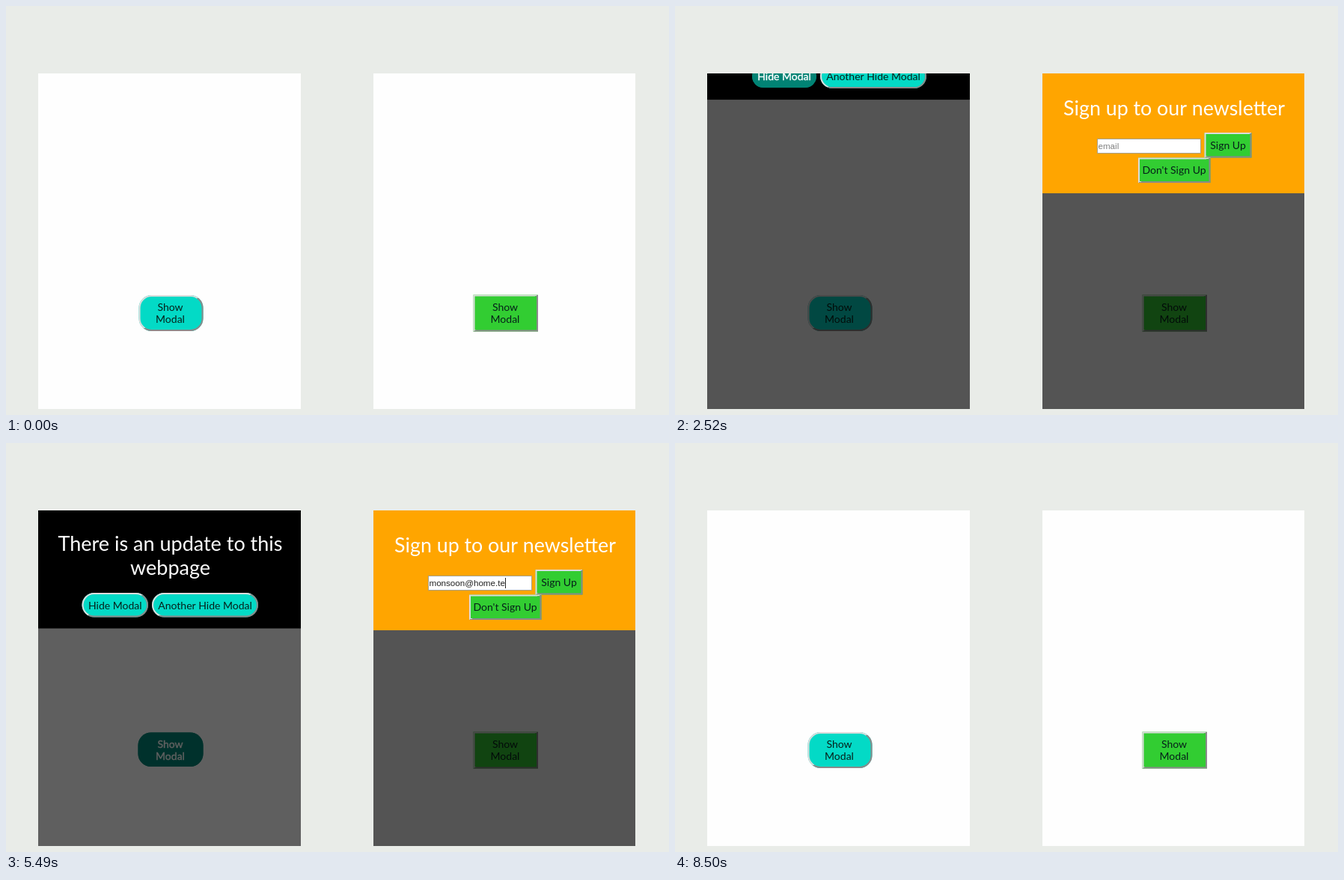
Write an HTML page with a canvas that moves like this. It is 886x546 px and loops after 9050 ms.

```html
<!DOCTYPE html>
<html lang="en">
<head>
<meta charset="utf-8">
<title>Modal demo</title>
<style>
html, body { margin: 0; width: 886px; height: 546px; overflow: hidden; background: #e9ece8; }
canvas { display: block; }
</style>
</head>
<body>
<canvas id="stage" width="886" height="546"></canvas>
<script>
const ctx = document.getElementById('stage').getContext('2d');
const LOOP = 9050;
const TOP = 90, PANEL_H = 448, MODAL_H = 160;
const EMAIL = 'monsoon@home.test';
const KEY_TIMES = [2760, 2830, 2910, 2980, 3370, 3450, 3520, 3840, 4710,
  4790, 4860, 5010, 5170, 5320, 5490, 5560, 5640];

const TEAL = { fill: '#03dac6', focusFill: '#018374', focusEdge: '#018374', focusText: '#fff' };
const GREEN = { fill: '#32cd32', focusFill: '#b8860b', focusEdge: '#ffa500', focusText: '#0a2a24' };

const LEFT = { x: 43, w: 351, fadeIn: 2147, slideIn: 2279, fadeOut: 5440, slideOut: 5432 };
const RIGHT = { x: 491, w: 350, fadeIn: 1495, slideIn: 1626, fadeOut: 6680, slideOut: 6680 };

const progress = (t, start, length) => Math.min(1, Math.max(0, (t - start) / length));
const smooth = p => p * p * (3 - 2 * p);
const within = (t, from, to) => t >= from && t < to;

function label(text, x, y, size, color, align = 'center', family = 'Lato, sans-serif') {
  ctx.font = `${size}px ${family}`;
  ctx.textAlign = align;
  ctx.fillStyle = color;
  ctx.fillText(text, x, y);
}

function roundBox(x, y, w, h, r) {
  ctx.beginPath();
  ctx.roundRect(x, y, w, h, r);
}

// Outset border: light on the top and left, dark on the bottom and right.
function bevel(x, y, w, h) {
  const cx = x + w / 2, cy = y + h / 2;
  const g = ctx.createLinearGradient(cx - h / 2, cy - w / 2, cx + h / 2, cy + w / 2);
  g.addColorStop(0, '#dcdcdc');
  g.addColorStop(0.5, '#dcdcdc');
  g.addColorStop(0.5, '#8a8a8a');
  g.addColorStop(1, '#8a8a8a');
  return g;
}

function button(x, y, w, h, r, theme, focused, lines, textX, baseline) {
  const edge = focused ? 1 : 2;
  roundBox(x, y, w, h, r);
  ctx.fillStyle = focused ? theme.focusFill : theme.fill;
  ctx.fill();
  roundBox(x + edge / 2, y + edge / 2, w - edge, h - edge, Math.max(0, r - edge / 2));
  ctx.lineWidth = edge;
  ctx.strokeStyle = focused ? theme.focusEdge : bevel(x, y, w, h);
  ctx.stroke();
  const color = focused ? theme.focusText : '#06201a';
  lines.forEach((line, i) => {
    label(line, textX, baseline + i * 16, 14, color);
    if (focused && theme === TEAL) {
      ctx.lineWidth = 0.4;
      ctx.strokeStyle = color;
      ctx.strokeText(line, textX, baseline + i * 16);
    }
  });
}

function showLeft(t) {
  const focused = within(t, 1370, 2150) || within(t, 5470, 7300);
  const box = focused ? [176.5, 386.5, 87, 45.5] : [177.5, 386, 86, 48];
  button(...box, 17, TEAL, focused, ['Show', 'Modal'], 219.5, 407);
}

function showRight(t) {
  const focused = within(t, 820, 1500) || within(t, 6650, 8500);
  const box = focused ? [624, 384.5, 87, 50] : [624.5, 385.5, 86.5, 49];
  button(...box, 0, GREEN, focused, ['Show', 'Modal'], 667, 407);
}

function leftModal(t) {
  label('There is an update to this', 219.5, 146.5, 27, '#fff');
  label('webpage', 219.5, 178.5, 27, '#fff');
  const second = within(t, 3370, 4220) || within(t, 4710, 5470);
  const first = t < 5470 && !second;
  let x = first || second ? 103 : 101.5;
  const place = (text, w, focused) => {
    const width = focused ? w - 2.5 : w;
    const box = focused ? [x, 204, width, 30] : [x, 202.5, width, 32.5];
    button(...box, box[3] / 2, TEAL, focused, [text], x + width / 2, 224);
    x += width + 5;
  };
  place('Hide Modal', 88.5, first);
  place('Another Hide Modal', 142, second);
}

function emailField(t) {
  const family = '"Liberation Sans", Arial, sans-serif';
  ctx.fillStyle = '#fff';
  ctx.fillRect(564, 177, 139, 20);
  ctx.lineWidth = 1;
  ctx.strokeStyle = '#a5a08c';
  ctx.strokeRect(564.5, 177.5, 138, 19);
  const typed = EMAIL.slice(0, KEY_TIMES.filter(k => k <= t).length);
  label(typed || 'email', 565.5, 190.5, 11.6, typed ? '#222' : '#808080', 'left', family);
  const caret = typed && t < 6110 && !within(t, 4390, 4710);
  if (caret) {
    ctx.fillRect(Math.round(565.5 + ctx.measureText(typed).width), 180, 1, 14);
  }
}

function rightModal(t) {
  label('Sign up to our newsletter', 667, 146, 26.8, '#fff');
  emailField(t);
  button(707.5, 169, 63, 33.5, 0, GREEN, within(t, 6110, 6340), ['Sign Up'], 739, 191);
  button(619, 202.5, 96.5, 33.5, 0, GREEN, within(t, 6340, 6650), ["Don't Sign Up"], 667, 224);
}

function panel(t, p, modalColor, drawShow, drawModal) {
  ctx.save();
  ctx.beginPath();
  ctx.rect(p.x, TOP, p.w, PANEL_H);
  ctx.clip();
  ctx.fillStyle = '#fefefe';
  ctx.fillRect(p.x, TOP, p.w, PANEL_H);
  drawShow(t);

  const shade = progress(t, p.fadeIn, 200) - progress(t, p.fadeOut, 200) ** 2;
  ctx.fillStyle = `rgba(0,0,0,${shade * 0.667})`;
  ctx.fillRect(p.x, TOP, p.w, PANEL_H);

  const shown = smooth(progress(t, p.slideIn, 800)) - smooth(progress(t, p.slideOut, 800));
  if (shown > 0) {
    ctx.translate(0, (shown - 1) * MODAL_H);
    ctx.fillStyle = modalColor;
    ctx.fillRect(p.x, TOP, p.w, MODAL_H);
    drawModal(t);
  }
  ctx.restore();
}

function frame() {
  const t = performance.now() % LOOP;
  ctx.fillStyle = '#e9ece8';
  ctx.fillRect(0, 0, 886, 546);
  panel(t, LEFT, '#000', showLeft, leftModal);
  panel(t, RIGHT, '#ffa500', showRight, rightModal);
  requestAnimationFrame(frame);
}
frame();
</script>
</body>
</html>
```
